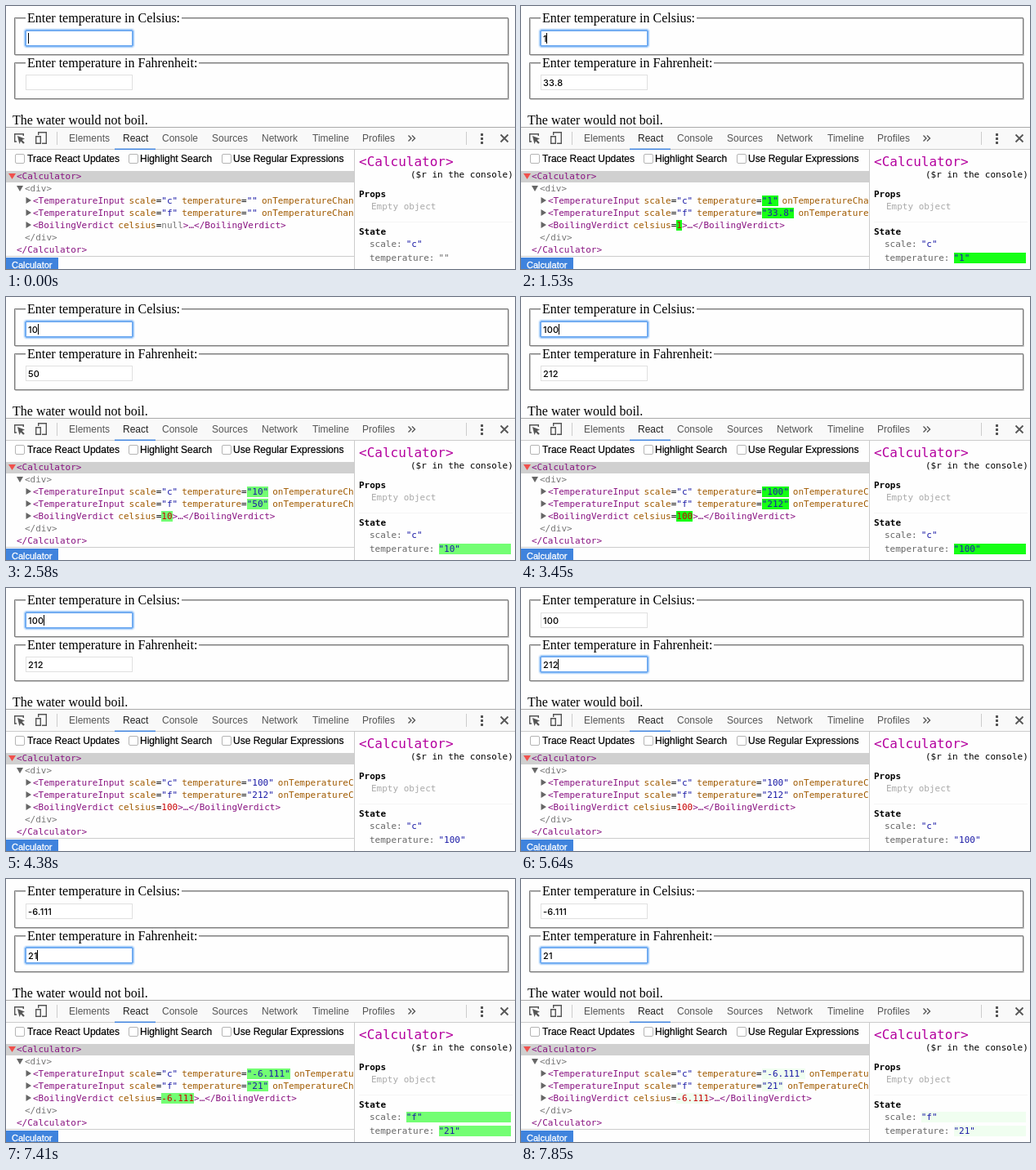
Recreate the animation shown at these times as an HTML page. Size 623 by 322 pixels, loop 8000 ms.

```html
<!DOCTYPE html>
<html lang="en">
<head>
<meta charset="utf-8">
<title>Temperature calculator</title>
<style>
  html, body { margin: 0; width: 100%; height: 100%; overflow: hidden; background: #fefefe; }
  #stage { position: relative; width: 623px; height: 322px; overflow: hidden; }
  svg { position: absolute; left: 0; top: 0; }
  text { white-space: pre; }
  .page { font: 16px "Liberation Serif", serif; }
  .field { font: 500 11px Inter, sans-serif; letter-spacing: .2px; }
  .ui { font: 12px "Liberation Sans", sans-serif; fill: #555; }
  .dark { fill: #222; }
  .options { fill: #000; stroke: #000; stroke-width: .2; }
  .crumb { font: 11px "Liberation Sans", sans-serif; fill: #fff; stroke: #fff; stroke-width: .3; }
  .mono, #tree { font: 11px "DejaVu Sans Mono", monospace; }
  .mono { fill: #666; }
  .bold { font-weight: bold; fill: #000; }
  .icon { fill: none; stroke: #555; stroke-width: 1.4; }
  .input { fill: #fff; stroke: #e0e0e0; }
  .box { fill: #fff; stroke: #b4b4b4; }
  .str { fill: #1a1aa6; }
  #tree { position: absolute; left: 0; top: 201px; width: 426px; height: 105px; overflow: hidden; color: #881280; }
  #tree div { height: 15px; line-height: 15px; white-space: pre; }
  #tree .in { padding-left: 33px; }
  #tree i { font-style: normal; color: #a05a00; margin-left: 5px; }
  #tree i::after { content: "="; color: #000; }
  #tree b { font-weight: normal; color: #1a1aa6; }
  #tree .tag { color: #777; padding-left: 23px; }
  #tree .num { color: #c80000; }
  #tree .num.none { color: #777; }
</style>
</head>
<body>
<div id="stage">
<svg width="623" height="322" viewBox="0 0 623 322">
  <defs>
    <g id="ring" fill="none">
      <rect x="-2.5" y="-2.5" width="136" height="24" rx="3.5" stroke="#e9f3fe"/>
      <rect x="-1.5" y="-1.5" width="134" height="22" rx="2.5" stroke="#b5d6fa"/>
      <rect x="-.5" y="-.5" width="132" height="20" rx="1.5" stroke="#7ab2f3"/>
      <rect x=".5" y=".5" width="130" height="18" stroke="#6aa7f0"/>
    </g>
    <rect id="check" class="box" x=".5" y=".5" width="11" height="11" rx="1.5"/>
  </defs>

  <!-- page -->
  <g fill="none">
    <path d="M11.5 15.5H615.5V60.5H11.5ZM11.5 70.5H615.5V114.5H11.5Z" stroke="#c4c4c4"/>
    <path d="M10.5 14.5H614.5V59.5H10.5ZM10.5 69.5H614.5V113.5H10.5Z" stroke="#7c7c7c"/>
  </g>
  <path d="M24 10H215V20H24ZM24 65H236V75H24Z" fill="#fefefe"/>
  <g class="page">
    <text x="26" y="20">Enter temperature in Celsius:</text>
    <text x="26" y="75">Enter temperature in Fahrenheit:</text>
    <text id="verdict" x="8" y="145"></text>
  </g>
  <rect class="input" x="24.5" y="30.5" width="130" height="18"/>
  <rect class="input" x="24.5" y="84.5" width="130" height="18"/>
  <use id="ringC" href="#ring" x="24" y="30"/>
  <use id="ringF" href="#ring" x="24" y="84"/>
  <rect id="selection" x="27" y="87" width="19" height="13" fill="#b4d5fe"/>
  <g class="field">
    <text id="celsius" x="27" y="44"></text>
    <text id="fahrenheit" x="27" y="98"></text>
  </g>
  <rect id="caret" width="1" height="13"/>

  <!-- tab bar -->
  <rect y="148" width="623" height="28" fill="#f9f9f9"/>
  <path d="M0 148.5H623" stroke="#aaa"/>
  <path d="M0 175.5H623" stroke="#ccc"/>
  <rect x="133" y="174.5" width="50" height="1.5" fill="#4285e0"/>
  <path d="M62.5 154V170M563.5 154V170" stroke="#ccc"/>
  <path class="icon" d="M13 166H10.7V156.7H21.3V159M39.7 158V154.7H49.3V168.3H44M36.7 159.7H42.3V168.3H36.7Z"/>
  <path d="M14 159L23 162.5L19.6 164L22.8 167.2L21.2 168.8L18 165.6L16.5 169Z" fill="#555"/>
  <g class="ui">
    <text x="77" y="166">Elements</text>
    <text x="143" y="166" class="dark">React</text>
    <text x="191" y="166">Console</text>
    <text x="252" y="166">Sources</text>
    <text x="313" y="166">Network</text>
    <text x="375" y="166">Timeline</text>
    <text x="436" y="166">Profiles</text>
  </g>
  <path class="icon" d="M492.5 158.5L496 162L492.5 165.5M497 158.5L500.500 162L497 165.5"/>
  <path class="icon" style="stroke-width:1.8" d="M605.5 157.5L614.5 166.5M614.5 157.5L605.5 166.5"/>
  <path d="M581 156h3v3h-3zM581 161h3v3h-3zM581 166h3v3h-3z" fill="#555"/>

  <!-- options -->
  <use href="#check" x="11" y="181"/>
  <use href="#check" x="150" y="181"/>
  <use href="#check" x="264" y="181"/>
  <g class="ui options">
    <text x="26" y="191">Trace React Updates</text>
    <text x="164" y="191">Highlight Search</text>
    <text x="278" y="191">Use Regular Expressions</text>
  </g>

  <!-- tree background -->
  <rect y="202" width="426" height="14" fill="#d0d0d0"/>
  <path d="M3 205H12L7.5 212Z" fill="#f0504c"/>
  <path d="M13 220H21L17 227ZM24.500 234L31 238L24.5 242ZM24.5 249L31 253L24.5 257ZM24.5 264L31 268L24.5 272Z" fill="#666"/>
  <path d="M0 306.5H426" stroke="#ccc"/>
  <rect y="308" width="64" height="14" fill="#3f83dd"/>
  <text x="7" y="321" class="crumb">Calculator</text>

  <!-- side panel -->
  <path d="M426.5 176V322" stroke="#ccc"/>
  <path d="M432 264.5H620" stroke="#f5f5f5"/>
  <rect class="flash" x="530" y="302" width="88" height="13" fill="#0f0"/>
  <rect id="scaleFlash" x="490" y="285" width="128" height="13" fill="#0f0"/>
  <g class="mono">
    <text x="432" y="196" style="font-size:16px" fill="#b4009e">&lt;Calculator&gt;</text>
    <text x="495" y="210" fill="#000">($r in the console)</text>
    <text x="432" y="234" class="bold">Props</text>
    <text x="447" y="249" fill="#aaa">Empty object</text>
    <text x="432" y="280" class="bold">State</text>
    <text x="445" y="295">scale:<tspan id="stateScale" dx="5" class="str"></tspan></text>
    <text x="445" y="312">temperature:<tspan id="stateTemp" dx="5"></tspan></text>
  </g>
</svg>
<div id="tree">
  <div style="padding-left:13px">&lt;Calculator&gt;</div>
  <div class="tag">&lt;div&gt;</div>
  <div class="in">&lt;TemperatureInput<i>scale</i><b>"c"</b><i>temperature</i><b class="flash" id="attrC"></b><i>onTemperatureChange</i><b>onTemperatureChange()</b>&gt;</div>
  <div class="in">&lt;TemperatureInput<i>scale</i><b>"f"</b><i>temperature</i><b class="flash" id="attrF"></b><i>onTemperatureChange</i><b>onTemperatureChange()</b>&gt;</div>
  <div class="in">&lt;BoilingVerdict<i>celsius</i><b class="flash num" id="attrNum"></b>&gt;…&lt;/BoilingVerdict&gt;</div>
  <div class="tag">&lt;/div&gt;</div>
  <div style="padding-left:13px">&lt;/Calculator&gt;</div>
</div>
</div>
<script>
const LOOP = 8000, FADE = 1000, FOCUS_START = 4830, FOCUS_END = 4920, DESELECT = 5640;
const edits = [
  { at: 0, c: "", f: "", scale: "c" },
  { at: 1440, c: "1", f: "33.8", scale: "c" },
  { at: 2310, c: "10", f: "50", scale: "c" },
  { at: 3360, c: "100", f: "212", scale: "c" },
  { at: 7140, c: "-6.111", f: "21", scale: "f" },
];
const caretOff = [[360, 900], [1950, 2310], [2840, 3360], [3870, 4380],
  [FOCUS_START, DESELECT], [6100, 6630], [7650, LOOP]];

const $ = id => document.getElementById(id);
const flashes = document.querySelectorAll(".flash");
const quote = s => `"${s}"`;
const show = (el, alpha) => el.setAttribute("opacity", alpha);

// cubic-bezier(.25, .1, .25, 1)
function ease(x) {
  const curve = (s, a, b) => 3 * s * (1 - s) ** 2 * a + 3 * s * s * (1 - s) * b + s ** 3;
  let lo = 0, hi = 1;
  for (let i = 0; i < 20; i++) {
    const mid = (lo + hi) / 2;
    if (curve(mid, .25, .25) < x) lo = mid; else hi = mid;
  }
  return curve(lo, .1, 1);
}

let current;
function setValues(edit) {
  if (edit === current) return;
  current = edit;
  const { c, f, scale } = edit;
  $("celsius").textContent = c;
  $("fahrenheit").textContent = f;
  $("attrC").textContent = quote(c);
  $("attrF").textContent = quote(f);
  $("attrNum").textContent = c || "null";
  $("attrNum").classList.toggle("none", !c);
  $("stateScale").textContent = quote(scale);
  $("stateTemp").textContent = quote(scale === "c" ? c : f);
  $("stateTemp").setAttribute("class", c ? "str" : "");
  $("verdict").textContent = `The water would ${+c >= 100 ? "" : "not "}boil.`;
}

function draw(t) {
  const edit = edits.findLast(e => e.at <= t);
  setValues(edit);

  const age = (t - edit.at) / FADE;
  const glow = edit.at && age < 1 ? 1 - ease(age) : 0;
  for (const el of flashes) {
    if (el.tagName === "rect") show(el, glow);
    else el.style.background = `rgba(0,255,0,${glow})`;
  }
  show($("scaleFlash"), edit.scale === "f" ? glow : 0);

  const focusF = t < FOCUS_START ? 0 : t < FOCUS_END ? .5 : 1;
  show($("ringC"), 1 - focusF);
  show($("ringF"), focusF);
  show($("selection"), t >= FOCUS_START && t < DESELECT ? 1 : 0);

  const field = focusF ? $("fahrenheit") : $("celsius");
  const width = field.textContent ? field.getComputedTextLength() : 0;
  $("caret").setAttribute("x", Math.floor(27 + width));
  $("caret").setAttribute("y", focusF ? 87 : 33);
  show($("caret"), caretOff.some(([a, b]) => t >= a && t < b) ? 0 : 1);
}

const start = performance.now();
function tick() {
  draw((performance.now() - start) % LOOP);
  requestAnimationFrame(tick);
}
tick();
</script>
</body>
</html>
```
